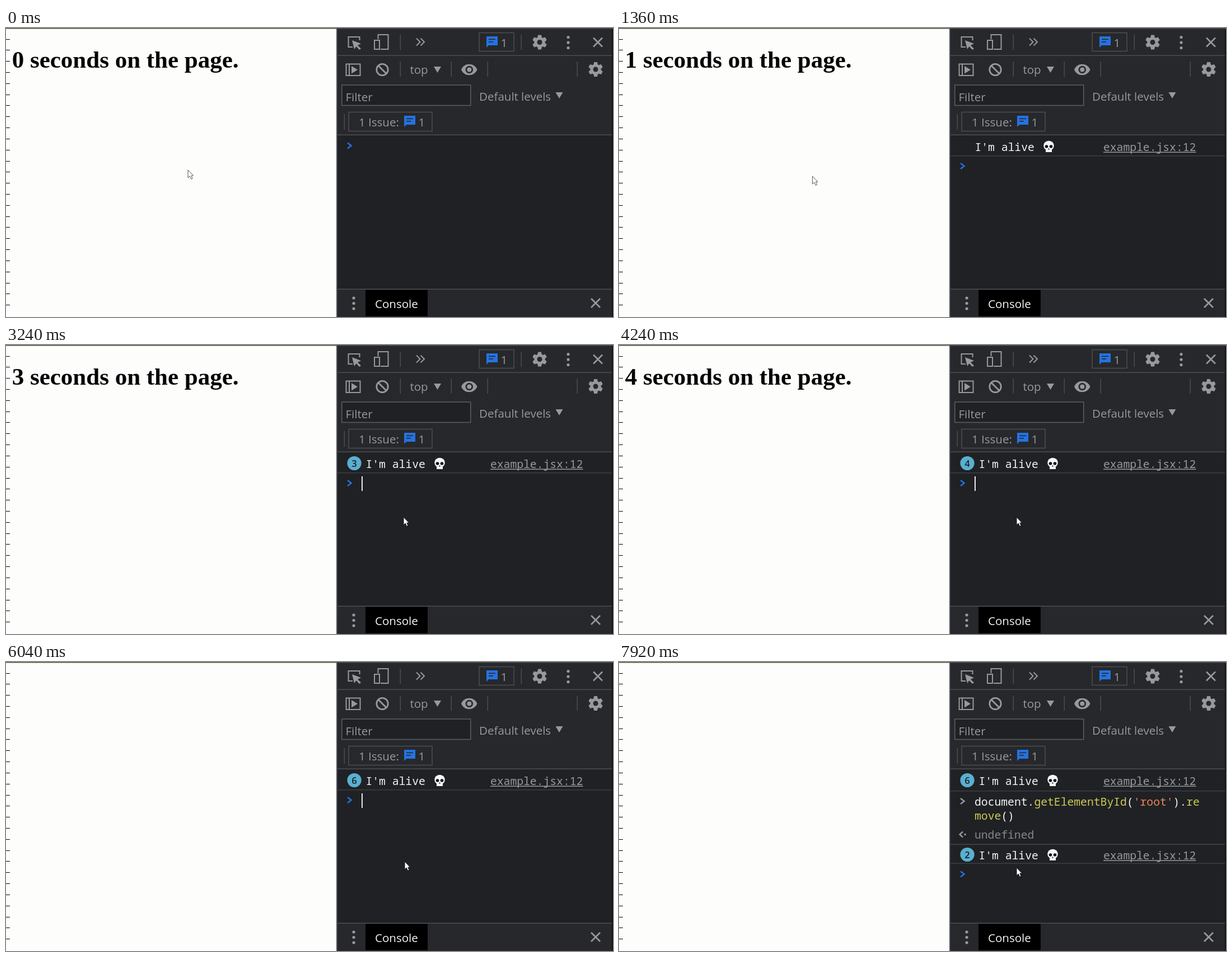
Write an HTML page with a canvas that moves like this. It is 1084 by 517 pixels and loops after 8 s.

```html
<!DOCTYPE html>
<html lang="en">
<head>
<meta charset="utf-8">
<title>Seconds on the page</title>
<style>
html, body { margin: 0; width: 100%; height: 100%; overflow: hidden; background: #fdfdfc; }
canvas { display: block; width: 100vw; height: 100vh; }
</style>
</head>
<body>
<canvas id="stage" width="1084" height="517"></canvas>
<script>
const ctx = document.getElementById('stage').getContext('2d');
const LOOP = 8000;
const UI = '20.5px "Open Sans", "Noto Sans", sans-serif';
const MONO = '500 19.7px "Noto Sans Mono", "DejaVu Sans Mono", monospace';
const CHAR = 11.82;
const BAR = '#27282b', BODY = '#202124', EDGE = '#4b4d55', GREY = '#96999d';
const WHITE = '#f4f5f6', BLUE = '#2473e2', YELLOW = '#cdcb57', ORANGE = '#ef8556';

// Times of the visible events, in ms
const FIRST_TICK = 840, CLICK = 3040, PASTE = 4760, ENTER = 6000, ECHO = 6120;

// Pointer positions: time, x, y
const POINTER = [
  [0, 325, 254], [1200, 325, 254], [1360, 345, 265], [1680, 520, 285],
  [2000, 700, 302], [2240, 710, 308], [5760, 710, 308], [6040, 712, 357],
  [6240, 712, 366], [6840, 712, 366], [7040, 710, 368], [LOOP, 710, 368]
];

function rect(x, y, w, h, color) {
  ctx.fillStyle = color;
  ctx.fillRect(x, y, w, h);
}

function frame(x, y, w, h, color, lw = 1.5) {
  ctx.strokeStyle = color;
  ctx.lineWidth = lw;
  ctx.strokeRect(x, y, w, h);
}

function path(points, close) {
  ctx.beginPath();
  for (let i = 0; i < points.length; i += 2) ctx.lineTo(points[i], points[i + 1]);
  if (close) ctx.closePath();
}

function line(points, color = GREY, lw = 2) {
  path(points);
  ctx.strokeStyle = color;
  ctx.lineWidth = lw;
  ctx.stroke();
}

function poly(points, color = GREY) {
  path(points, true);
  ctx.fillStyle = color;
  ctx.fill();
}

function disc(x, y, r, color) {
  ctx.beginPath();
  ctx.arc(x, y, r, 0, Math.PI * 2);
  ctx.fillStyle = color;
  ctx.fill();
}

function text(str, x, y, color = GREY, font = UI) {
  ctx.font = font;
  ctx.fillStyle = color;
  ctx.fillText(str, x, y);
}

function cross(x, y) {
  line([x - 8, y - 8, x + 8, y + 8], GREY, 2.6);
  line([x + 8, y - 8, x - 8, y + 8], GREY, 2.6);
}

function dots(x, y) {
  for (const d of [-9.5, 0, 9.5]) disc(x, y + d, 2.6, GREY);
}

function gear(x, y) {
  disc(x, y, 9.6, GREY);
  for (let i = 0; i < 6; i++) {
    ctx.save();
    ctx.translate(x, y);
    ctx.rotate(i * Math.PI / 3);
    poly([-4, -8, -2.8, -13, 2.8, -13, 4, -8]);
    ctx.restore();
  }
  disc(x, y, 4.5, BAR);
}

function chat(x, y) {
  poly([x, y, x + 20, y, x + 20, y + 16, x + 4, y + 16, x, y + 20], BLUE);
  rect(x + 4, y + 4.5, 12, 1.6, BAR);
  rect(x + 4, y + 9, 8, 1.6, BAR);
}

function divider(x, y, h = 27) {
  rect(x - 0.5, y, 1.5, h, EDGE);
}

function rule(y, color = EDGE) {
  rect(592, y, 490, 1.5, color);
}

function dropArrow(x, y) {
  poly([x, y, x + 13, y, x + 6.5, y + 11]);
}

function drawMainBar() {
  line([619, 34, 611.5, 34, 611.5, 16, 631.5, 16, 631.5, 22]);
  poly([618, 22, 634, 28, 628, 31, 634, 37, 631, 39, 625.5, 33, 622, 38]);
  frame(664.5, 12, 18, 26, GREY, 2);
  rect(656, 20, 13, 20, BAR);
  frame(658, 22, 9, 16, GREY, 2);
  divider(704, 12);
  for (const x of [733, 740.5]) line([x, 18.5, x + 6.5, 25, x, 31.5]);
  frame(845, 8.5, 62, 33, EDGE);
  chat(858, 15);
  text('1', 883.5, 33.5);
  divider(920, 12);
  gear(953, 25.5);
  dots(1004, 26);
  cross(1057, 25.5);
  rule(48.5);
}

function drawConsoleBar() {
  frame(607.5, 64.5, 25, 20.5, GREY, 2);
  line([613, 64, 613, 86]);
  poly([617, 68, 628, 74.7, 617, 81.5]);
  ctx.beginPath();
  ctx.arc(672, 74.5, 10.2, 0, Math.PI * 2);
  ctx.strokeStyle = GREY;
  ctx.lineWidth = 2.8;
  ctx.stroke();
  line([665, 67.5, 679, 81.5], GREY, 2.8);
  divider(704, 60);
  text('top', 721.5, 82);
  dropArrow(764, 69);
  divider(795, 60);
  ctx.beginPath();
  ctx.moveTo(813, 74.5);
  ctx.bezierCurveTo(818, 61.5, 836, 61.5, 841.5, 74.5);
  ctx.bezierCurveTo(836, 87.5, 818, 87.5, 813, 74.5);
  ctx.fillStyle = GREY;
  ctx.fill();
  disc(827.3, 74.5, 6.8, BAR);
  disc(827.3, 74.5, 4, GREY);
  divider(860, 60);
  divider(1020, 60);
  gear(1053, 74);

  rect(599, 102, 231, 36, BODY);
  frame(599.7, 102, 230, 36.5, '#5b5e63');
  text('Filter', 606.5, 130.5);
  text('Default levels', 845, 129.5);
  dropArrow(981.5, 115);

  divider(604, 154, 28);
  frame(612, 150.5, 149, 34, EDGE);
  text('1 Issue:', 630, 176);
  chat(711, 157);
  text('1', 736.5, 176);
  rule(190.5);
}

function drawPanel() {
  rect(590, 0, 494, 517, BAR);
  rect(592, 192, 490, 275, BODY);
  rect(590, 0, 2, 517, EDGE);
  rect(1082, 0, 2, 517, '#111214');
  rect(590, 0, 494, 1.5, EDGE);
  drawMainBar();
  drawConsoleBar();
  rule(466.5);
  dots(621, 492.5);
  rect(642, 468.5, 111, 47, '#000');
  text('Console', 659, 500.5, WHITE);
  cross(1053, 492);
}

function drawPage(seconds, alive) {
  rect(0, 0, 590, 517, '#fdfdfc');
  rect(0, 0, 590, 1.5, '#52533f');
  for (let i = 1; i <= 25; i++) rect(0, Math.round(i * 19.82 - 0.3), 7, 1, '#000');
  if (alive) {
    text(seconds + ' seconds on the page.', 10.67, 70.5, '#050505',
      'bold 43px "Liberation Serif", "Times New Roman", serif');
  }
}

function skull(x, y) {
  ctx.beginPath();
  ctx.ellipse(x, y - 1.5, 9.3, 8.8, 0, 0, Math.PI * 2);
  ctx.fillStyle = WHITE;
  ctx.fill();
  rect(x - 5.5, y + 4, 11, 6, WHITE);
  disc(x - 4, y, 2.8, '#101113');
  disc(x + 4, y, 2.8, '#101113');
  poly([x, y + 3, x - 1.6, y + 5.5, x + 1.6, y + 5.5], '#101113');
}

function logRow(y, count) {
  const x = count > 1 ? 643 : 636;
  if (count > 1) {
    disc(622, y - 0.5, 12.6, '#5aafd0');
    ctx.textAlign = 'center';
    text(count, 622, y + 5.5, '#17242b', '600 16.5px "Open Sans", sans-serif');
    ctx.textAlign = 'left';
  }
  text("I'm alive", x - 0.5, y + 7.5, WHITE, MONO);
  skull(x + 131.5, y);
  text('example.jsx:12', 865, y + 7.5, GREY, MONO);
  rect(865, y + 9.5, 165.5, 1.5, GREY);
}

function chevron(y, color) {
  line([610, y - 5, 616.5, y, 610, y + 5], color, 2.4);
}

// Colored console command, wrapped after the given column
function command(y, lineStep, wrap) {
  const parts = [['document.', WHITE], ['getElementById', YELLOW], ['(', WHITE],
    ["'root'", ORANGE], [').', WHITE], ['remove', YELLOW], ['()', WHITE]];
  let col = 0;
  for (const [word, color] of parts) {
    for (const ch of word) {
      const row = col < wrap ? 0 : 1;
      text(ch, 635 + (col - row * wrap) * CHAR, y + row * lineStep, color, MONO);
      col++;
    }
  }
}

function caret(x, y, t, since) {
  if (Math.floor((t - since) / 500) % 2 === 0) rect(x, y, 1.8, 26, '#fff');
}

function drawLog(t, ticks) {
  if (!ticks) return chevron(210.5, BLUE);
  logRow(212, Math.min(ticks, 6));
  if (t < ECHO) {
    rule(228, '#3a3d4a');
    chevron(247, BLUE);
    if (t >= ENTER) caret(635, 235, t, ENTER);
    else if (t >= PASTE) {
      command(254.5, 26, 33);
      rect(695, 285, 23, 2, WHITE);
      caret(717.5, 261, t, PASTE);
    } else if (t >= CLICK) caret(635, 235, t, CLICK);
    return;
  }
  rule(230, '#3a3d4a');
  chevron(249, GREY);
  command(256.5, 25.5, 34);
  line([614, 303.5, 608.5, 308.5, 614, 313.5], GREY, 2.4);
  disc(618, 308.5, 1.8, GREY);
  text('undefined', 635, 315.5, '#82868b', MONO);
  const extra = ticks - 6;
  rule(extra > 0 ? 325.5 : 323.5, '#44474f');
  let y = 343.5;
  if (extra > 0) {
    logRow(345, extra);
    rule(359.5, '#3a3d4a');
    y = 379.5;
  }
  chevron(y, BLUE);
  caret(635, y - 12, t, ENTER);
}

function drawPointer(t) {
  const i = POINTER.findIndex(p => p[0] > t);
  const [t0, x0, y0] = POINTER[i - 1], [t1, x1, y1] = POINTER[i];
  const k = (t - t0) / (t1 - t0);
  const x = x0 + (x1 - x0) * k;
  ctx.save();
  ctx.translate(x, y0 + (y1 - y0) * k);
  poly([0, 0, 0, 14, 3.2, 11, 5.6, 16.3, 8, 15.2, 5.8, 10.2, 9.5, 10], '#fff');
  ctx.strokeStyle = x < 590 ? '#55555c' : '#18191b';
  ctx.lineWidth = 1;
  ctx.stroke();
  ctx.restore();
}

function draw(now) {
  const t = now % LOOP;
  const ticks = Math.max(0, Math.floor((t - FIRST_TICK) / 1000) + 1);
  drawPage(ticks, t < ENTER);
  drawPanel();
  drawLog(t, ticks);
  drawPointer(t);
}

const start = performance.now();
function loop() {
  draw(performance.now() - start);
  requestAnimationFrame(loop);
}
loop();
</script>
</body>
</html>
```
